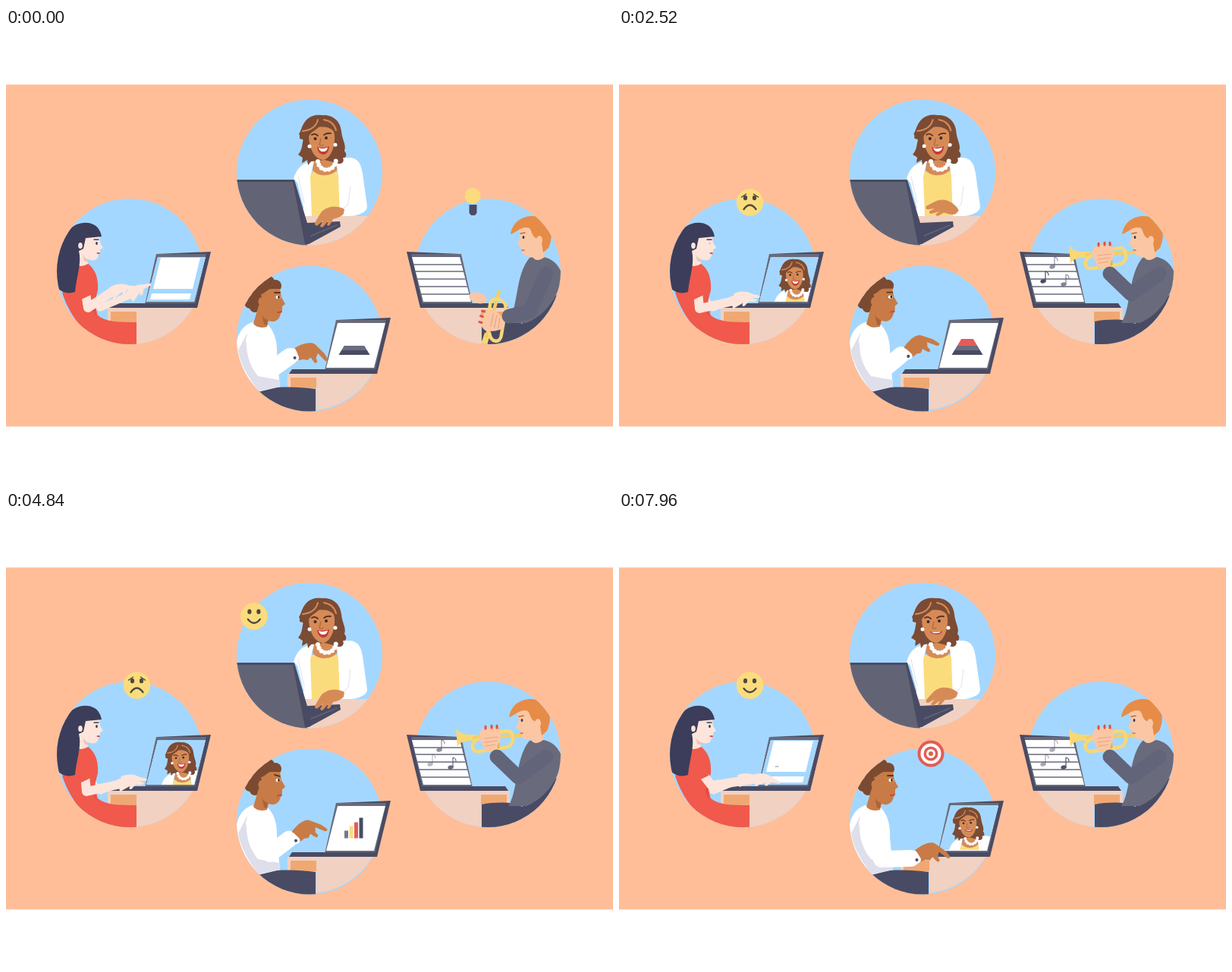
An HTML page that plays this animation: 800 by 600 pixels, repeating every 8000 ms.

```html
<!DOCTYPE html>
<html lang="en">
<head>
<meta charset="utf-8">
<title>Online class</title>
<style>
  html, body { margin: 0; width: 100%; height: 100%; overflow: hidden; background: #fff; }
  svg { display: block; width: 100vw; height: 100vh; }
  .line { fill: none; stroke-linecap: round; stroke-linejoin: round; }
</style>
</head>
<body>
<svg id="stage" viewBox="0 0 800 600"></svg>
<script>
const LOOP = 8000;
const SKY = '#a4d7ff', NAVY = '#494b64', GREY = '#696b7c', DESK = '#f1d1c1', YELLOW = '#fbdc7d',
      RED = '#f0594c', PALE = '#fde5db', TAN = '#d68b57', BROWN = '#c87b46', PEACH = '#fbc6a4';

const shape = (fill, d, more = '') => `<path fill="${fill}" d="${d}" ${more}/>`;
const line = (color, width, d, more = '') =>
  `<path class="line" stroke="${color}" stroke-width="${width}" d="${d}" ${more}/>`;
const dot = (fill, x, y, rx, ry = rx, more = '') =>
  `<ellipse fill="${fill}" cx="${x}" cy="${y}" rx="${rx}" ry="${ry}" ${more}/>`;
const group = (attrs, ...parts) => `<g ${attrs}>${parts.join('')}</g>`;
const arm = (id, color, width) => line(color, width, '', `id="${id}"`);
const hand = (id, color) => shape(color,
  'M-3-6C6-9 15-7 22-2l8 3q2 3-2 3l-9-1-5 5q-4 1-3-2l1-2-14 6z', `id="${id}"`);

const SCREEN = 'M200 302H263L248 361H185Z';
const desk = shape(DESK, 'M172 369H262V420H172ZM134 369H173V389H134Z') + shape('#f0a873', 'M138 374H172V388H138Z');
const laptop = shape(NAVY, 'M199 298 270 295 252 369H183Z') + shape(GREY, 'M198 298 264 298 249 365H183Z')
  + shape(NAVY, 'M140 363H250L252 369H136Z') + shape('#fff', SCREEN);
const video = dx => `<rect x="180" y="298" width="90" height="66" fill="${SKY}"/>
  <use href="#presenter" transform="translate(${dx} 228) scale(.67)"/>`;

const presenter = group('id="presenter"',
  group('id="gesture"',
    shape('#fff', 'M342 201 362 194 384 199 384 206H342Z'),
    shape(TAN, 'M319 191q0-3 5-2l14-1-3-4q1-3 5-1l9 4-1-8q2-5 6-1l4 11q2 6-3 8l-15 3Q327 196 319 191Z')),
  shape(YELLOW, 'M400 190H439L441 249H400Z'),
  shape(TAN, 'M408 164H434L438 185C430 197 411 197 404 187Z'),
  shape('#fff', 'M406 175C391 178 384 183 379 199L384 204 397 255 403 248 401 196ZM434 171 455 171C465 173 468 180 470 192L476 235C476 245 460 249 440 249L438 195Z'),
  line('#e5e5ef', 1.2, 'M454 209 451 232Q446 239 440 238M385 196 393 231'),
  group('id="head"',
    shape('#7b4b34', 'M387 142C391 119 403 113 417 115 433 114 441 125 442 136 443 148 449 154 446 162 451 168 447 172 444 171 447 177 441 181 436 178L420 174 402 176 398 181 397 174 390 178 391 171 385 167C391 161 390 152 392 147L387 146Z'),
    shape(TAN, 'M399 140C400 127 432 127 433 140 434 157 428 172 418 174 407 173 399 160 399 140Z'),
    shape('#7b4b34', 'M386 140C395 121 407 114 417 115 431 115 439 125 441 144L433 142 432 132C425 124 420 125 417 125 411 135 400 136 398 146L393 150Z'),
    line(TAN, 2, 'M391 136Q408 134 411 121M419 121Q432 123 435 135'),
    line('#5c3325', 1.8, 'M403 141Q407 138 411 142M419 141Q423 138 428 139'),
    group('id="eyes"', dot('#3c2b2b', 407.5, 146, 2, 2.1), dot('#3c2b2b', 422, 145, 2, 2.1)),
    line('#b96e42', 1.6, 'M415 146 413 154Q416 156 418 154'),
    group('id="mouth"', shape('#c43a35', 'M410-3Q418-1 426-4 425 7 418 7 411 6 410-3Z'),
      shape('#fff', 'M412-2Q418 0 424-2.5 423 3 418 3 413 3 412-2Z')),
    dot('#fff', 400, 156, 2.5), dot('#fff', 434, 154, 2.5)),
  line('#fff', 6, 'M411 176Q413 187 423 187 433 186 435 174', 'stroke-dasharray="0 5.1"'));

const face = (id, body) => group(`id="${id}"`, body);

const leftWoman = group('clip-path="url(#leftClip)"',
  arm('womanFar', PALE, 9), hand('womanFarHand', PALE),
  shape(RED, 'M92 311 107 310C118 318 122 330 121 346 116 354 117 366 121 379 132 388 150 388 172 388V420H150C108 416 84 380 74 349 88 340 92 325 92 311Z'),
  shape('#dd4941', 'M121 346C115 356 116 366 119 382L114 370Z'),
  arm('womanNear', PALE, 12), hand('womanNearHand', PALE),
  shape(RED, 'M92 316C108 314 116 333 118 349L97 359C90 345 88 330 92 316Z'),
  shape(PALE, 'M100 272 123 273 124 283 128 290 124 292 124 297 122 299C121 306 116 308 108 305L108 311Q98 317 92 311L96 288Z'),
  shape('#e9c6bd', 'M108 305Q102 302 101 298L103 307 108 309Z'),
  shape('#3c3d5a', 'M83 267C91 256 108 254 117 260 123 264 125 270 126 275L105 277 102 291 96 294C100 310 93 327 91 348 80 352 68 347 65 337 65 308 67 287 83 267Z'),
  dot(PALE, 98, 287, 2.8, 4), dot('#3c3d5a', 119.5, 284, 1.4, 2, 'id="womanEye"'),
  line('#3c3d5a', 1.3, 'M116 279 122 279'), line('#d6544f', 1.8, 'M120.5 297H123'));

const curls = [[335, 337, 8], [346, 335, 8], [355, 340, 8], [325, 342, 9], [321, 351, 8], [322, 362, 8],
  [328, 368, 7], [337, 350, 13]].map(c => dot('#7b4a31', ...c)).join('');
const bottomMan = group('clip-path="url(#bottomClip)"',
  shape(NAVY, 'M326 482C340 472 378 472 408 476V508H310Z'),
  shape('#fff', 'M324 388C310 394 304 405 303 422V440C312 458 323 474 332 480L361 473 357 430C358 410 352 398 344 390Z'),
  shape('#dedfeb', 'M318 402Q313 436 332 459L360 464 361 473 333 479Q309 448 306 425Z'),
  arm('manSleeve', '#fff', 22),
  group('id="manHand"', shape(BROWN, 'M-2-7C7-13 17-17 24-14L37-3 43 5Q43 9 39 7L29-2 27 4 29 9Q27 13 24 9L20 4 16 8 10 7Q5 10 0 8Z'),
    line('#fff', 9, 'M-4-2 0 6'), dot(NAVY, -1, 6, 2)),
  face('manFace', curls
    + shape(BROWN, 'M336 351C342 350 344 344 350 344L361 344 363 355 368 364 364 367 364 372 362 377C360 386 353 389 346 386L344 394Q332 397 326 390L333 366Z')
    + shape('#ad6436', 'M345 385Q338 382 337 377L340 391 344 392Z')
    + dot('#7b4a31', 333, 357, 4, 9) + dot(BROWN, 336.5, 361, 4, 6)
    + line('#593420', 1.8, 'M354 349 361 349', 'id="manBrow"')
    + dot('#fff', 358.5, 355, 3, 2.2) + dot('#332b32', 359.5, 355, 1.4, 2)
    + line('#c74b41', 2, '', 'id="manMouth"')));

const trumpet = group('id="trumpet"',
  shape('#f8d775', 'M-48-14C-42-4-31-5-20-5V3C-33 2-42 3-46 11Z'),
  line('#f3cd65', 4.5, 'M-24-1 37-4'),
  line('#f8d775', 4.5, 'M-19 1C-31 7-27 18-18 17L16 12C32 10 29-11 19-10L-10-5'),
  line('#e1b44d', 3, 'M-9-13-8 15M-1-14 0 14M7-14 8 12'),
  shape(PEACH, 'M-18-3Q-15-15-6-15L6-14Q13-9 11 1L4 15-8 17-14 7Z'),
  line('#e9a583', 1.2, 'M-10 0 7-2M-10 5 6 3M-9 10 4 8'),
  line('#de5149', 3, 'M-9-16V-13M-1-17V-14M6-17V-14'));

const note = (id, x, y) => group(`id="${id}"`, dot(NAVY, x, y, 3.7, 2.6, `transform="rotate(-15 ${x} ${y})"`),
  line(NAVY, 1.2, `M${x + 3} ${y}v-13q4 1 4 5`));

const rightMan = group('clip-path="url(#rightClip)"',
  shape(NAVY, 'M627 387C647 383 672 384 680 390L728 350V420H627Z'),
  shape(GREY, 'M690 303C710 298 724 305 731 320 735 347 712 379 686 389L662 389C675 370 671 325 690 303Z', 'id="sweater"'),
  face('boyFace', shape(PEACH, 'M672 264 694 260 705 280 707 302Q696 310 691 302 676 302 677 290L671 285 675 276Z')
    + shape('#e68c47', 'M662 272C665 249 690 244 704 251 718 260 718 276 712 290L705 296 702 278 695 277C690 274 690 268 687 264 678 260 672 268 662 272Z')
    + dot(PEACH, 700, 280, 4, 6) + dot('#38364a', 679, 276, 1.4, 2) + line('#bd6c3b', 1.6, 'M675 271 681 270')
    + line('#d6655a', 1.6, 'M677 293H680')),
  dot(PEACH, 0, 0, 12, 7, 'id="boyFar"'),
  trumpet, arm('boyArm', '#62647a', 19));

const circle = (x, y) => `<circle cx="${x}" cy="${y}" r="96"/>`;
const clip = (id, inner) => `<clipPath id="${id}">${inner}</clipPath>`;

stage.innerHTML = `<defs>
  ${clip('topClip', circle(400, 190.5))}${clip('leftClip', circle(163, 321))}
  ${clip('rightClip', circle(635, 321))}${clip('bottomClip', circle(400, 409.5))}
  ${clip('screenClip', `<path d="${SCREEN}"/>`)}${clip('pyramidClip', '<path d="M459 397 479.5 431H438.5Z"/>')}
  </defs>
  <rect y="74.5" width="800" height="451" fill="#ffbe98"/>
  <g fill="${SKY}">${circle(400, 190.5)}${circle(163, 321)}${circle(635, 321)}${circle(400, 409.5)}</g>`
  + group('clip-path="url(#topClip)"', presenter, shape(DESK, 'M383 248H500V290H383Z'),
    shape('#626475', 'M300 201H379L398 290H300Z'), shape(NAVY, 'M300 200H380L397 257 440 255 441 262 399 285 394 285 378 203H300Z'),
    line('#626475', 1.5, 'M402 274 436 260'),
    shape(TAN, 'M446 239C438 234 422 233 414 245L407 257q0 5 4 3l7-6-4 7q2 4 5 0l6-7-2 6q3 2 5-2l3-6q10-2 14-7z', 'id="typing"'))
  + group('clip-path="url(#leftClip)"', desk) + laptop
  + group('clip-path="url(#screenClip)"', group('id="page"', shape(SKY, SCREEN),
      shape('#fff', 'M204 303H256L246 344H194ZM192 350H244L242 358H190Z'), line('#8f93a5', 1, '', 'id="typed"')),
    group('id="call"', video(-49))) + leftWoman
  + group('transform="translate(237 87)"', group('clip-path="url(#leftClip)"', desk), laptop)
  + group('clip-path="url(#pyramidClip)"', ...[['tierTop', YELLOW, 397, 14], ['tierMid', '#e35d58', 410, 9],
      ['tierLow', '#6b6c7e', 419, 6], ['tierBase', NAVY, 425, 7]].map(([id, color, y, h]) =>
      `<rect id="${id}" x="435" y="${y}" width="50" height="${h}" fill="${color}"/>`))
  + group('id="chart"', ...['#777989', YELLOW, '#e35d58', NAVY].map((color, i) =>
      `<rect x="${446 + i * 6.5}" y="${-[10, 16, 21, 27][i]}" width="5" height="${[10, 16, 21, 27][i]}" fill="${color}"/>`))
  + group('id="webcam"', group('transform="translate(237 87)" clip-path="url(#screenClip)"', video(-56)))
  + bottomMan
  + group('transform="matrix(-1 0 0 1 798 0)"', group('clip-path="url(#leftClip)"', desk), laptop)
  + line(GREY, 1.4, 'M537 312H601M539 321H603M541 331H605M544 341H608M546 351H610')
  + note('note0', 571, 315) + note('note1', 559, 334) + note('note2', 586, 338) + rightMan
  + group('id="bulb"', dot(YELLOW, 615, 221.5, 10.5), shape(NAVY, 'M610.5 233H620.5V244L618 247H613L610.5 244Z'))
  + ['mood', 'smile'].map(id => group(`id="${id}"`, dot(YELLOW, 0, 0, 17.8),
      group(`id="${id}Eyes"`, dot('#4c4941', -6, -6, 2.6, 3.2), dot('#4c4941', 6, -6, 2.6, 3.2)),
      line('#4c4941', 2.3, 'M-8 4Q0 14 8 4', `id="${id}Mouth"`),
      id === 'mood' ? line('#4c4941', 1.5, 'M-11-7-5-11M5-11 11-7', 'id="moodBrows"') : '')).join('')
  + group('id="goal"', ...[17.5, 13.5, 9.5, 6, 3].map((r, i) => dot(i % 2 ? '#fff' : '#e15d55', 0, 0, r)));

const $ = id => document.getElementById(id);
const set = (id, name, value) => $(id).setAttribute(name, value);
const move = (id, value) => set(id, 'transform', value);
const fade = (id, value) => set(id, 'opacity', value);

// Eased interpolation through [time, ...values] stops.
function key(t, ...stops) {
  let i = stops.findIndex(s => s[0] > t);
  if (i === 0) return stops[0].slice(1);
  if (i < 0) return stops[stops.length - 1].slice(1);
  const a = stops[i - 1], b = stops[i];
  let p = (t - a[0]) / (b[0] - a[0]);
  p = p * p * (3 - 2 * p);
  return a.slice(1).map((v, k) => v + (b[k + 1] - v) * p);
}
const joint = (id, sx, sy, ex, ey, wx, wy) => set(id, 'd', `M${sx} ${sy}L${ex} ${ey} ${wx} ${wy}`);
const blink = (t, period, phase) => (t + phase) % period < 130 ? 0.15 : 1;
const squash = (id, y, s) => move(id, `translate(0 ${y * (1 - s)}) scale(1 ${s})`);

function drawPresenter(t) {
  const [dx, turn] = key(t, [0, 0, 0], [1100, 1, 0], [1440, 1.5, 0], [2300, 2, 1], [2800, 2, 0], [3400, 0, -1], [4200, 0, 0]);
  move('head', `translate(${dx} 0) rotate(${turn} 418 175)`);
  const [open] = key(t, [0, 1], [1200, 1], [1380, .4], [1700, .4], [1900, 1], [7500, 1], [7700, .4]);
  move('mouth', `translate(0 160) scale(1 ${open})`);
  squash('eyes', 146, blink(t, 2600, 1900));
  const [lift] = key(t, [3250, 42], [3650, 0], [4450, 0], [4850, 42]);
  move('gesture', `translate(${lift * .5} ${lift})`);
  const [swing] = key(t, [700, 0], [1100, 33], [2700, 33], [3100, 0], [7500, 0], [7800, 12]);
  move('typing', `rotate(${swing} 444 243)`);
}

function drawWoman(t) {
  const tap = (t < 500 || t > 6500) ? Math.sin(t / 70) : 0;
  const [ex, ey, wx, wy, a] = key(t, [100, 108, 369, 141, 347, -15], [700, 106, 370, 151, 360, -6],
    [7000, 106, 370, 151, 360, -6], [7600, 122, 362, 182, 353, 3]);
  joint('womanNear', 103, 338, ex, ey, wx, wy);
  move('womanNearHand', `translate(${wx} ${wy}) rotate(${a + tap * 3})`);
  const [fx, fy, b] = key(t, [100, 164, 352, -33], [700, 155, 356, -8], [6200, 155, 356, -8], [6600, 160, 354, -4]);
  joint('womanFar', 110, 355, 124, 369, fx, fy);
  move('womanFarHand', `translate(${fx} ${fy}) rotate(${b - tap * 3})`);
  squash('womanEye', 284, t > 6650 && t < 7000 ? .2 : blink(t, 3100, 700));
  fade('call', key(t, [700, 0], [900, 1], [6150, 1], [6350, 0])[0]);
  set('typed', 'd', t > 7200 ? `M206 337h${Math.min(4, (t - 7200) / 150)}` : '');

  fade('mood', key(t, [500, 0], [800, 1])[0]);
  move('mood', `translate(172.5 ${key(t, [500, 240], [900, 230])[0]})`);
  const [end, bend] = key(t, [6100, 9, -2], [6500, 4, 14]);
  set('moodMouth', 'd', `M-8 ${end}Q0 ${bend} 8 ${end}`);
  fade('moodBrows', key(t, [6100, 1], [6400, 0])[0]);
  squash('moodEyes', -6, key(t, [6550, 1], [6700, 0], [6860, 0], [7000, 1])[0]);
}

function drawMan(t) {
  const [ex, ey, wx, wy, a] = key(t, [1800, 349, 451, 382, 429, 4], [2250, 348, 451, 380, 427, -22],
    [4700, 348, 451, 380, 427, -22], [5200, 347, 456, 385, 436, -10], [5800, 347, 456, 385, 436, -10],
    [6400, 346, 460, 390, 449, -12], [7100, 346, 460, 390, 449, -12], [7500, 346, 459, 393, 454, -5]);
  joint('manSleeve', 327, 412, ex, ey, wx - 8, wy + 4);
  move('manHand', `translate(${wx} ${wy}) rotate(${a + (t < 1700 ? Math.sin(t / 130) * 1.5 : 0)})`);
  const [sad] = key(t, [3000, 0], [3700, 1], [7100, 1], [7600, 0]);
  set('manMouth', 'd', `M358 ${375 + sad}Q361 ${375 - sad * 2} 363 ${374 + sad}`);
  move('manBrow', `rotate(${sad * 16} 358 349)`);
  move('manFace', `rotate(${key(t, [1800, 0], [2300, -1], [4800, 0])[0]} 334 390)`);

  fade('tierTop', key(t, [900, 0], [1150, 1], [2100, 1], [2350, 0])[0]);
  fade('tierMid', key(t, [400, 0], [650, 1], [2800, 1], [3050, 0])[0]);
  for (const id of ['tierLow', 'tierBase']) fade(id, key(t, [3400, 1], [3700, 0])[0]);
  const [grow] = key(t, [4300, 0], [4800, 1], [5250, 1], [5650, .03], [5850, 0]);
  move('chart', `translate(0 431.5) scale(1 ${grow})`);
  const [zoom] = key(t, [6500, 0], [6700, .24], [6950, .24], [7400, 1]);
  move('webcam', `translate(485 447) scale(${zoom}) translate(-485 -448)`);
  fade('goal', key(t, [6780, 0], [7150, 1])[0]);
  move('goal', `translate(411 ${key(t, [6780, 325], [7500, 320])[0]})`);
}

function drawMusician(t) {
  const [x, y, turn, ex, ey, wx, wy] = key(t, [250, 642, 384, -72, 690, 374, 663, 380],
    [900, 641, 300, 0, 675, 351, 647, 324], [6300, 641, 300, 0, 675, 351, 647, 324],
    [6650, 632, 302, -8, 674, 351, 643, 327], [7050, 632, 302, -8, 674, 351, 643, 327], [7400, 641, 300, 0, 675, 351, 647, 324]);
  move('trumpet', `translate(${x} ${y}) rotate(${turn})`);
  joint('boyArm', 712, 324, ex, ey, wx, wy);
  const [hx, hy, show] = key(t, [250, 622, 356, 1], [900, 636, 298, 1]);
  move('boyFar', `translate(${hx} ${hy}) rotate(15)`);
  fade('boyFar', show);
  const [nod] = key(t, [250, 3], [900, 0], [1440, -1], [2300, 1], [6300, 1], [6650, 4], [7050, 4], [7400, 0]);
  move('boyFace', `translate(${nod} 0)`);
  for (let i = 0; i < 3; i++) {
    const shown = key(t, [700 + i * 150, 0], [950 + i * 150, 1])[0];
    fade('note' + i, shown * (.68 + .32 * Math.sin(t / 260 - i * 1.7)));
  }
  fade('bulb', key(t, [1200, 1], [1680, 0])[0]);
}

function drawSmile(t) {
  const p = (t - 4000) / 1640;
  fade('smile', key(t, [3800, 0], [4400, 1], [6200, 1], [6650, 0])[0]);
  move('smile', `translate(${332 - 10 * p} ${148 - 18 * p}) scale(${key(t, [3800, .5], [4600, 1])[0]})`);
}

function frame() {
  const t = performance.now() % LOOP;
  for (const draw of [drawPresenter, drawWoman, drawMan, drawMusician, drawSmile]) draw(t);
  requestAnimationFrame(frame);
}
frame();
</script>
</body>
</html>
```
